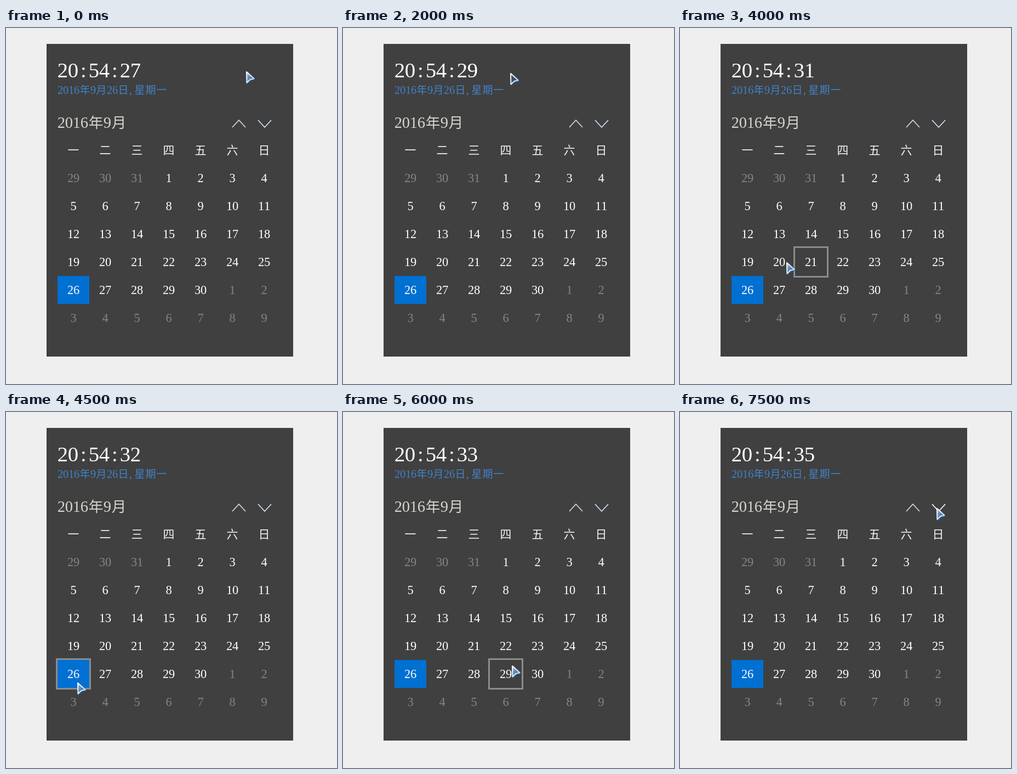
An HTML page that plays this animation: 604 by 649 pixels, repeating every 8000 ms.

```html
<!DOCTYPE html>
<html lang="zh">
<head>
<meta charset="utf-8">
<style>
html, body { margin: 0; width: 100%; height: 100%; overflow: hidden; background: #efefef; }
svg { display: block; }
text { font-family: "Liberation Serif", "Noto Sans CJK SC", "Noto Sans CJK", serif; font-weight: 300; text-anchor: middle; }
</style>
</head>
<body>
<svg id="stage" width="604" height="649" viewBox="0 0 604 649">
  <defs>
    <linearGradient id="steel" x1="0" y1="0" x2="1" y2="1">
      <stop offset="0" stop-color="#a9c4de"/>
      <stop offset=".45" stop-color="#5f87b2"/>
      <stop offset="1" stop-color="#31557f"/>
    </linearGradient>
    <linearGradient id="rim" x1="0" y1="0" x2="1" y2="1">
      <stop offset="0" stop-color="#ffffff"/>
      <stop offset="1" stop-color="#b4d4f4"/>
    </linearGradient>
    <filter id="glow" x="-50%" y="-50%" width="200%" height="200%">
      <feDropShadow dx="1" dy="1" stdDeviation="1.1" flood-color="#1f5fa6" flood-opacity=".9"/>
    </filter>
  </defs>
  <rect x="74" y="29" width="450" height="570" fill="#404040"/>
  <rect x="94" y="452" width="58" height="51" fill="#0070d2"/>
  <g id="labels"></g>
  <path d="M413 181L425 168L437 181" fill="none" stroke="#ddd6ca" stroke-width="1.8"/>
  <path id="next" d="M460 168L472 181L484 168" fill="none" stroke-width="1.8"/>
  <rect id="hover" width="61" height="54" fill="none" stroke="#8c8c8c" stroke-width="3"/>
  <g id="cursor" filter="url(#glow)">
    <path id="arrow" d="M1 1L14.5 13.2L7.4 15L1.4 20.8Z" stroke="url(#rim)" stroke-width="2" stroke-linejoin="round"/>
  </g>
</svg>
<script>
const NS = "http://www.w3.org/2000/svg";
const $ = id => document.getElementById(id);
const STEP = 500, LOOP = 8000;

// pointer x, pointer y, hovered day (0 = none)
const steps = [
  [438, 79, 0], [245, 75, 0], [137, 75, 0], [101, 85, 0],
  [305, 82, 0], [97, 116, 0], [258, 95, 0], [258, 125, 0],
  [194, 427, 21], [130, 493, 26], [246, 471, 28], [269, 473, 28],
  [308, 462, 29], [346, 438, 23], [461, 189, 0], [468, 175, 0]
];
const hollowSteps = [4, 6, 13];

// Half-em cells for Latin characters, full-em cells for ideographs.
function label(str, x, y, size, fill) {
  const text = document.createElementNS(NS, "text");
  text.setAttribute("fill", fill);
  for (const ch of str) {
    const half = ch.charCodeAt(0) < 256;
    const width = half ? size / 2 : size;
    const span = document.createElementNS(NS, "tspan");
    span.setAttribute("x", x + width / (ch === "," ? 3 : 2));
    span.setAttribute("y", y);
    span.setAttribute("font-size", size * (half ? 1.02 : .95));
    span.textContent = ch;
    text.append(span);
    x += width;
  }
  $("labels").append(text);
  return text;
}

const clock = label("20:54:27", 94, 90, 38, "#ffffff");
label("2016年9月26日,星期一", 94, 120, 20, "#4182c8");
label("2016年9月", 94, 181.5, 28, "#d6d4ce");

[..."一二三四五六日"].forEach((ch, i) => label(ch, 112 + 58 * i, 229.5, 22, "#f4f4f4"));

for (let i = 0; i < 42; i++) {
  const day = i - 2;
  const inMonth = day > 0 && day <= 30;
  const str = String(day < 1 ? day + 31 : day > 30 ? day - 30 : day);
  const x = 123 + 58 * (i % 7) - str.length * 5.5;
  const y = 281 + 51 * Math.floor(i / 7);
  label(str, x, y, 22, inMonth ? "#ffffff" : "#858585");
}

function showTime(seconds) {
  [...`20:54:${seconds}`].forEach((ch, i) => clock.children[i].textContent = ch);
}

function showHover(day) {
  const hover = $("hover"), cell = day + 2;
  hover.setAttribute("visibility", day ? "visible" : "hidden");
  hover.setAttribute("x", 92.5 + 58 * (cell % 7));
  hover.setAttribute("y", 246.5 + 51 * Math.floor(cell / 7));
}

const start = performance.now();
let shown = -1;

function draw() {
  const n = Math.floor(((performance.now() - start) % LOOP) / STEP);
  if (n !== shown) {
    shown = n;
    const [x, y, day] = steps[n];
    showTime(27 + Math.floor((n + 1) / 2));
    showHover(day);
    $("cursor").setAttribute("transform", `translate(${x} ${y})`);
    $("arrow").setAttribute("fill", hollowSteps.includes(n) ? "#3c4c64" : "url(#steel)");
    $("next").setAttribute("stroke", n === 15 ? "#ffffff" : "#cfdff0");
  }
  requestAnimationFrame(draw);
}
draw();
</script>
</body>
</html>
```
